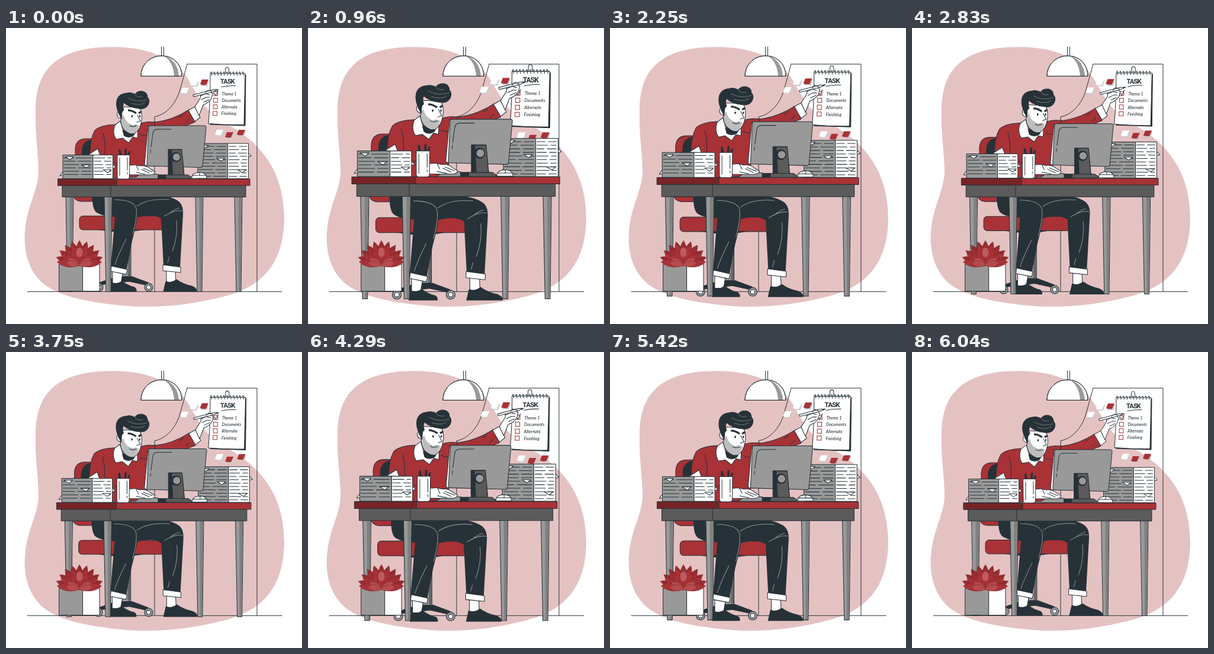
Write an HTML page that moves like this. It is 500 px wide and 500 px high and loops after 6080 ms.

```html
<!DOCTYPE html>
<html lang="en">
<head>
<meta charset="utf-8">
<title>Task planning at the desk</title>
<style>
html,body{margin:0;width:100%;height:100%;overflow:hidden;background:#fff}
svg{display:block;width:100vw;height:100vh}
.o{stroke:#263238;stroke-width:1;stroke-linejoin:round;stroke-linecap:round}
.n{fill:none}.w{fill:#fff}.r{fill:#a83236}.dr{fill:#782426}.g{fill:#999}.dg{fill:#5b5b5b}.k{fill:#263238}
.title{font:700 11px Roboto,"Liberation Sans",sans-serif;letter-spacing:-.8px;text-anchor:middle}
.note{font:italic 500 6.8px Lato,"Open Sans",sans-serif}
</style>
</head>
<body>
<svg viewBox="0 0 500 500">
<!-- room -->
<path fill="#e5c2c2" d="M50 140C50 75 80 32 180 32C235 32 282 48 306 84C326 117 336 141 369 160C424 189 470 236 470 322C469 399 432 438 366 454C310 468 260 473 210 470C150 465 91 456 61 430C36 407 28 372 33 334C38 296 56 270 55 238C54 205 49 180 50 140Z"/>
<path class="o n" d="M306 61H424V445M251 445V150C272 146 288 126 294 104L306 61"/>
<path class="o n" d="M36 445.300H466M262.500 32V46M266.500 32V46"/>
<path class="o w" d="M228 81C228 62 243 47 263 47S297 62 297 81Z"/>
<path class="g" d="M266 47C283 51 291 65 292 81H284C283 65 277 53 266 47Z"/>
<path class="o n" d="M228 81C228 62 243 47 263 47S297 62 297 81Z"/>

<g data-c="355 121" id="notes"></g>

<g data-c="350 121">
  <path class="o k" d="M348 79L405 79L404 165L345 163Z"/>
  <path class="o w" d="M345 77H404L402 163.500Q371 164 342 161.500Q345 124 345 77Z"/>
  <path class="o n" id="rings"/>
  <path class="o n" d="M370.500 76V70Q370.500 66.500 373.500 66.500T376.500 70V76"/>
  <text class="title k" x="374" y="94.500">TASK</text>
  <path class="o n" d="M364 99.500Q376 97 388 97.500"/>
  <g id="list"></g>
</g>

<g data-c="241 284">
  <path class="o r" d="M117 220V204Q118 188 133 187H146V224ZM113 279H146V293H127Q114 292 113 279Z"/>
  <path class="k" d="M128 220V207Q129 190 146 188V220Z"/>
  <rect class="o g" x="196" y="338" width="15" height="82"/>
  <rect x="206" y="339" width="4.500" height="80" fill="#666"/>
  <path class="o k" d="M155 431L188 420H213L240 430V435L208 428L158 434Z"/>
  <g class="o g"><circle cx="157" cy="438" r="7"/><circle cx="241" cy="438" r="7"/></g>
  <g class="o w"><circle cx="157" cy="438" r="3.500"/><circle cx="241" cy="438" r="3.500"/></g>
  <path class="k" d="M150 340H240L212 344H178Z"/>
  <rect class="o r" x="124" y="317.500" width="144" height="23.500" rx="6"/>
</g>

<g data-c="250 298">
  <path class="o g" d="M208 251L231 247H257V254.500H208Z"/>
  <path class="o k" d="M257 248H270V254.500H257Z"/>
  <path class="o dg" d="M270 248H307L313 252V254.500H270Z"/>
</g>

<!-- man -->
<g data-c="242 264">
  <path class="o w" d="M180 411L197 415L194 432L180 431ZM271 409L286 411L287 430L271 430Z"/>
  <path class="o k" d="M178 430Q187 434 196 428Q207 436 217 438Q221 441 220 445H176ZM266 445L270 428Q278 432 288 425Q299 433 314 436Q323 440 322 445Z"/>
  <path class="k" d="M146 282H260Q284 286 293 294Q300 301 299 315L294 405L266 401L262 322Q248 313 222 320Q219 338 213 360L203 411L177 404L184 319Q160 318 151 310Q145 302 146 282Z"/>
  <path class="n" stroke="#909090" d="M183 290Q216 290 220 305Q222 320 214 349M203 356Q190 382 184 400M221 301Q240 287 276 290M267 318Q286 306 298 309M275 314Q284 306 293 304M288 325Q291 350 281 377M276 386L273 397"/>
  <path class="o w" d="M178 402L205 408L203 416L177 411ZM265 400L295 404V413L265 410Z"/>

  <path class="o r" d="M184 163Q159 164 150 173Q142 187 142 210L144 240L160 254L219 252L238 238V190L319 159Q315 145 309 138Q281 156 252 159Q237 157 224 162Z"/>
  <path class="o n" d="M164 178Q169 196 167 214M252 158L251 166M183 227Q197 235 209 235M226 179Q232 183 237 181M292 151L299 147M303 160L309 154"/>
  <path class="o w" d="M308 139L319 133L328 151L319 158Z"/>
  <path class="o w" d="M319 133L328 119L329 112L337 108L344 107L349 111L347 119Q342 127 333 130L326 148Z"/>
  <path class="o w" d="M316 113L348 104.500L358 104L349 108L317 116Z"/>
  <path class="k" d="M353 104.500L359 104L354 106.500Z"/>
  <path class="o n" d="M328 115L337 111L344 113M330 121L338 117L344 117M334 125L343 121M337 109L341 105L348 107"/>
  <path class="o w" d="M190 229Q204 233 218 231L226 233Q238 232 244 238L252 243Q251 248 242 248H209L188 249Z"/>
  <path class="o n" d="M220 232L224 240M229 239L242 245M232 237L247 243M220 244L235 247"/>

  <path class="o w" d="M184 164L193 157L201 181L217 179L223 165L222 186L214 184L207 194L197 186L186 188Q179 177 184 164Z"/>
  <path class="k" d="M192 156L197 173L219 175L216 182Q207 188 199 182Z"/>
  <path class="o w" d="M195 133L226 134Q231 146 229 156Q227 172 217 178Q209 181 199 171Q194 164 194 153Q186 151 188 143Q191 139 196 142Z"/>
  <path fill="#bdbdbd" d="M195 150L199 147Q201 160 214 164Q219 161 225 165Q221 176 215 178Q207 179 199 170Q195 163 195 150Z"/>
  <path class="o k" d="M192 147Q185 134 187 123Q190 111 204 110Q210 108 218 112Q222 106 231 107Q239 109 239 117Q244 122 240 130Q235 138 224 136Q209 135 199 126Q196 132 199 138L196 142L195 154Z"/>
  <path class="n" stroke="#8b9295" stroke-width=".7" d="M218 112Q221 118 231 116M206 118Q221 127 239 121M211 127Q226 132 235 126"/>
  <path class="n" stroke="#263238" stroke-width="3" d="M206 139Q213 139 220 144M224 144L229 141"/>
  <path class="o n" d="M222 147L227 157L221 159M209 165Q214 168 220 165M190 145L194 149"/>
  <g class="k"><ellipse cx="213" cy="149" rx="1.300" ry="2"/><ellipse cx="226" cy="149" rx="1.200" ry="2"/></g>
</g>

<g data-c="250 298">
  <g id="legs"></g>
  <rect class="o dg" x="95" y="265" width="310" height="20.500"/>
  <path class="o n" d="M177 266V285"/>
  <rect class="o r" x="87.500" y="255" width="324.500" height="11"/>
  <path class="o dr" d="M87.500 255H187V266H87.500Z"/>
  <g id="stacks"></g>
  <path class="k" d="M191 216L190 206L193 205L196 216ZM200 216L201 204L204 204L204 216ZM205 216L207 208L210 209L208 217Z"/>
  <path class="o w" d="M188 214.500H209L208.500 252Q208 255 204 255H192Q188 255 188 251Z"/>
  <path class="n" stroke="#999" stroke-width="2" d="M192 219V250"/>
  <path class="o n" d="M205 219V240M205 244V247"/>
  <path class="o w" d="M240 165.500L234 231L238 234L245 165Z"/>
  <path class="o g" d="M243 165H335Q338 165 338 168L332 233Q331.500 236 328 235.500L240 233Q237.500 233 238 230L241 167Q241 165 243 165Z"/>
  <path class="o n" d="M245 201L248 178Q249 171 256 171H279M244 211L244.500 206"/>
  <path class="o k" d="M274 205H297L301 248H274Z"/>
  <path class="dg" d="M280 206H296.500L300 247.500H282Z"/>
  <circle class="o k" cx="287" cy="218" r="8"/><circle class="g" cx="288" cy="218" r="6"/>
  <path class="o w" d="M314 254Q313 245 326 244Q339 244 339 254Z"/>
  <path class="o n" d="M315 249H338M327 244V249"/>
</g>

<path class="o g" d="M90 399H130V444.500H90Z"/>
<path class="o w" d="M130 399H158V444.500H130Z"/>
<g id="plant" transform="translate(124 400)"></g>
</svg>
<script>
const LOOP = 6080;
const CYCLE = [[0, 1], [1150, 1.098], [3400, 1], [3610, 1], [4800, 1.097], [6040, 1], [LOOP, 1]];
const put = (id, html) => document.getElementById(id).innerHTML = html;
const path = (cls, d) => `<path class="${cls}" d="${d}"/>`;

let seed = 7;
const rand = () => (seed = seed * 16807 % 2147483647) / 2147483647;

put("notes", [[331, 87, "r"], [314, 88, "w"], [298, 101, "w"], [356, 172, "w"], [373, 176, "r"], [393, 172, "r"]]
  .map(([x, y, c]) => `<path fill="#ccc" d="M${x + 3} ${y + 2}h9l-3 9h-11z"/>` +
    path(c, `M${x} ${y}h11l-4 9q-6 1 -10 -1z`)).join(""));

document.getElementById("rings").setAttribute("d",
  Array.from({length: 11}, (_, i) => `M${347.5 + i * 5.35} 80v-5q-1.500 -2 -2 1`).join(""));

put("list", ["Theme 1", "Documents", "Alternate", "Finishing"].map((s, i) => {
  const y = 107.5 + i * 11.1, x = 350.8 - i * .35;
  return `<rect x="${x}" y="${y}" width="6.8" height="6.8" fill="#fff" stroke="#a83236"/>
    <text class="note k" x="${x + 14}" y="${y + 6.5}">${s}</text>`;
}).join("") + path("o n", "M352 110l2.500 4l4 -9"));

put("legs", [101, 166, 320, 386].map(x =>
  path("o g", `M${x} 285h13l-2 160.500h-8z`) +
  `<path fill="#808080" d="M${x + 6.5} 286h6l-2 159h-3.500z"/>`).join(""));

// Two bundles of sheets side by side with broken page edges.
function stack(x, y, w1, w2, h) {
  const w = w1 + w2;
  let edges = "", s = path("o w", `M${x + w - 2} ${y + 14}l7 7l-7 2z`) + path("o w", `M${x + 1} ${y + h - 13}l-6 8l8 -1z`) +
    path("o g", `M${x} ${y}h${w1}v${h}h${-w1}z`) + path("o w", `M${x + w1} ${y}h${w2}v${h}h${-w2}z`);
  for (let r = y + 5; r < y + h - 2; r += 5.6)
    for (const [a, len] of [[x, w1], [x + w1, w2]]) {
      const l = len * (.3 + rand() * .25);
      edges += `M${a + 2} ${r}h${l}M${a + l + 7} ${r}h${Math.max(3, len - l - 10)}`;
    }
  s += path("o n", edges);
  for (const [dx, dy] of [[4, 3], [w1 - 19, h * .42], [w1 + 17, h - 15]])
    s += path("o w", `M${x + dx} ${y + dy}h14l-6 5z`);
  return s;
}
put("stacks", path("o w", "M139 214l16 -10l4 11z") +
  stack(96, 214.5, 51, 33.500, 40) + stack(324, 195, 50.5, 35, 59.5));

const petal = (a, l, w, c) =>
  `<path fill="${c}" stroke="#782426" stroke-width=".4" transform="rotate(${a})" d="M0 2C${-w} ${-l * .4} ${-w} ${-l * .7} 0 ${-l}C${w} ${-l * .7} ${w} ${-l * .4} 0 2Z"/>`;
let leaves = "";
for (let i = -4; i <= 4; i++) leaves += petal(i * 18, 41, 8, "#942c30");
for (let i = -4; i <= 4; i++) leaves += petal(i * 20, 36, 9, i % 2 ? "#a83236" : "#9c2f33");
for (let i = -2; i <= 2; i++) leaves += petal(i * 28, 28, 9, "#a83236");
for (const a of [-83, 83]) leaves += petal(a, 38, 8, "#a83236");
leaves += `<ellipse cx="0" cy="-21" rx="5.500" ry="8" fill="#bd5b5e"/>`;
for (const a of [-62, 62, -82, 82]) leaves += petal(a, 23, 7, "#b44b4e");
put("plant", leaves);

const groups = [...document.querySelectorAll("[data-c]")].map(el => [el, el.dataset.c.split(" ").map(Number)]);

function scaleAt(t) {
  const i = CYCLE.findIndex(k => k[0] > t);
  const [t0, a] = CYCLE[i - 1], [t1, b] = CYCLE[i];
  return a + (b - a) * (t - t0) / (t1 - t0);
}

function draw() {
  const s = scaleAt(performance.now() % LOOP);
  for (const [el, [x, y]] of groups)
    el.setAttribute("transform", `translate(${x} ${y}) scale(${s}) translate(${-x} ${-y})`);
  requestAnimationFrame(draw);
}
draw();
</script>
</body>
</html>
```
